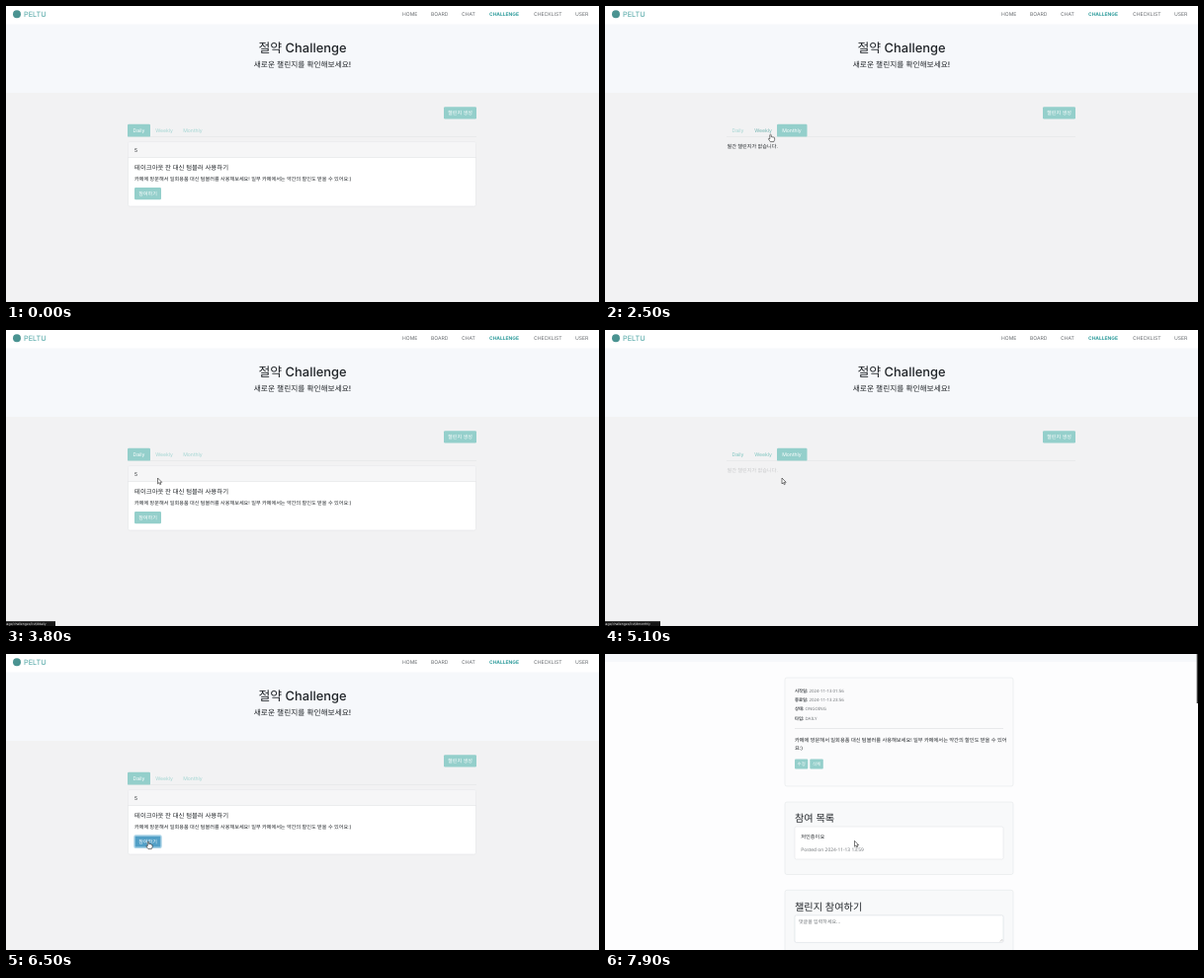
Animation of 600x300 px, one loop 8000 ms. Source, as an HTML page:

```html
<!DOCTYPE html>
<html lang="ko">
<head>
<meta charset="utf-8">
<title>Challenge</title>
<style>
html, body { margin: 0; width: 100%; height: 100%; overflow: hidden; background: #f2f2f3; }
svg { display: block; width: 100%; height: 100%; }
text { white-space: pre; text-rendering: geometricPrecision; }
.ui { font-family: Inter, "Noto Sans CJK KR", "Noto Sans CJK JP", sans-serif; }
.doc { font-family: "Noto Sans", "Noto Sans CJK KR", "Noto Sans CJK JP", sans-serif; }
</style>
</head>
<body>
<svg id="stage" viewBox="0 0 600 300"></svg>
<script>
const LOOP = 8000, STEP = 100;
const TEAL = '#94cfcb', INK = '#212529', GREY = '#74787c';

const rect = (x, y, w, h, fill, extra = '') =>
  `<rect x="${x}" y="${y}" width="${w}" height="${h}" fill="${fill}" ${extra}/>`;
const text = (x, y, size, str, fill = INK, extra = '') =>
  `<text x="${x}" y="${y}" font-size="${size}" fill="${fill}" ${extra}>${str}</text>`;
const group = (id, body, extra = '') => `<g id="${id}" ${extra}>${body}</g>`;
const edge = (color, r = 1.5) => `stroke="${color}" stroke-width=".5" rx="${r}"`;
const MID = 'text-anchor="middle" font-weight="500"';
const MEDIUM = 'font-weight="500"';

const tabs = [
  { name: 'Daily', x: 123, w: 23, tx: 128.5, bar: 50 },
  { name: 'Weekly', x: 146, w: 28, tx: 151.2, bar: 53 },
  { name: 'Monthly', x: 174, w: 30.5, tx: 179.2, bar: 56 }
];
const tip = '카페에 방문해서 일회용품 대신 텀블러를 사용해보세요! 일부 카페에서는 약간의 할인도 받을 수 있어';

function header(title, sub) {
  const links = [['HOME', 401], ['BOARD', 430], ['CHAT', 461], ['CHALLENGE', 489], ['CHECKLIST', 534], ['USER', 576]];
  return rect(0, 18, 600, 70, '#f6f8fb') + rect(0, 0, 600, 18.5, '#fff') +
    '<circle cx="11" cy="8.2" r="4" fill="#4a9391"/>' +
    text(18, 10.6, 7.3, 'PELTU', '#4aa3a2') +
    links.map(([s, x]) => s === 'CHALLENGE'
      ? text(x, 9.9, 4.95, s, '#2f9c9c', 'font-weight="700"')
      : text(x, 9.9, 5.1, s, '#666a6e')).join('') +
    text(300, 46.6, 12.9, title, INK, MID) +
    text(300, 61.6, 7.7, sub, INK, MID);
}

function card(num, title, body, id) {
  return rect(123.5, 138, 352, 65, '#fff', edge('#dcdee1')) +
    rect(123.8, 138.3, 351.4, 15.2, '#f6f6f7') + rect(123.5, 153.3, 352, .5, '#dcdee1') +
    text(130, 147.8, 5.1, num) +
    text(130, 166, 6.4, title, INK, MEDIUM) +
    text(130, 177.2, 5.12, body) +
    rect(130, 184, 27, 12.3, TEAL, `id="${id}" rx="1.2"`) +
    text(143.5, 192.1, 5.1, '참여하기', '#fff', MID);
}

function listPage() {
  return rect(0, 0, 600, 300, '#f2f2f3') + header('절약 Challenge', '새로운 챌린지를 확인해보세요!') +
    rect(443, 102.3, 33, 12.2, TEAL, 'rx="1.2"') +
    text(459.5, 110.3, 5.1, '챌린지 생성', '#fff', MID) +
    rect(123, 132.4, 353, .5, '#dfe1e3') +
    rect(123, 119.8, 23, 12.8, TEAL, 'id="pill" rx="1.2"') +
    tabs.map((t, i) => text(t.tx, 128, 5.12, t.name, TEAL, `id="tab${i}"`)).join('') +
    group('pane0', card('5', '테이크아웃 잔 대신 텀블러 사용하기', tip + '요:)', 'join')) +
    group('pane1', card('6', '무지출챌린지 예시예요', '일주일 지출없이 보내기', 'join2')) +
    group('pane2', text(123.5, 143.6, 5.12, '월간 챌린지가 없습니다.'));
}

// Laid out at its final scroll position.
function detailPage() {
  const box = (y, h) => rect(182, y, 231, h, '#f8f9fa', edge('#dfe2e5', 2));
  const field = (y, key, val) => `<text x="192" y="${y}" font-size="4.4" fill="${GREY}">` +
    `<tspan font-weight="600" fill="#45494d">${key}:</tspan> ${val}</text>`;
  const button = (x, w, s) => rect(x, 106.6, w, 10, TEAL, 'rx="1"') +
    text(x + w / 2, 113.2, 4.4, s, '#fff', 'text-anchor="middle"');
  return `<g class="ui" transform="translate(0 -80)">${header('테이크아웃 잔 대신 텀블러 사용하기', '챌린지 상세 정보')}</g>` +
    rect(182, 24, 231, 110, '#fbfbfc', edge('#dfe2e5', 2)) +
    field(39, '시작일', '2024-11-13 01:56') + field(48.2, '종료일', '2024-11-13 23:56') +
    field(57.4, '상태', 'ONGOING') + field(66.6, '타입', 'DAILY') +
    rect(192, 75.4, 211, .5, '#d5d7d9') +
    text(192, 89.2, 5.22, tip, INK, MEDIUM) + text(192, 97, 5.22, '요:)', INK, MEDIUM) +
    button(192, 13.3, '수정') + button(207.3, 13.5, '삭제') +
    box(150, 73.5) + text(192, 170.3, 10.2, '참여 목록', INK, MEDIUM) +
    rect(192, 175, 211, 33, '#fff', edge('#dcdfe2')) +
    text(198.3, 187, 5.2, '저인증이요', INK, MEDIUM) +
    text(198.3, 199.8, 4.9, 'Posted on 2024-11-13 13:59', GREY) +
    box(239.3, 130) + text(192, 259.8, 10.2, '챌린지 참여하기', INK, MEDIUM) +
    rect(192, 264.8, 211, 27.6, '#fff', edge('#ced4da')) +
    text(196, 272.6, 5, '댓글을 입력하세요...', GREY) +
    '<path d="M399.8 291.4l2.4-2.4M401.2 291.4l1-1" stroke="#888" stroke-width=".4"/>';
}

const arrow = '<path d="M0 0V5.9L1.4 4.7 2.3 6.7 3.3 6.2 2.4 4.3H4.2Z" fill="#fff" stroke="#222" stroke-width=".6" stroke-linejoin="round"/>';
const hand = '<path d="M-.7.6Q0-.4.7.6V2.7Q1.5 2.2 2 2.9 2.8 2.5 3.2 3.2 4 3 4.1 3.9V5.6L3.3 7.6H-.1L-2.1 4.9Q-2.2 3.8-.7 4.6Z" fill="#fff" stroke="#222" stroke-width=".6" stroke-linejoin="round"/>';

document.getElementById('stage').innerHTML =
  group('list', listPage(), 'class="ui"') +
  group('detail', rect(0, 0, 600, 300, '#fdfdfe') + group('sheet', detailPage()) +
    rect(598.7, 0, 1.3, 50, '#3a3a3a'), 'class="doc"') +
  group('bar', rect(0, 295.2, 53, 4.8, '#161616', 'id="barBox"') +
    text(-1.5, 299, 3.3, '', '#eee', 'id="barText"'), 'class="ui"') +
  group('arrow', arrow) + group('hand', hand);

const $ = id => document.getElementById(id);
const set = (id, attrs) => { for (const k in attrs) $(id).setAttribute(k, attrs[k]); };
const show = (id, on) => set(id, { display: on ? 'inline' : 'none' });
const clamp = v => Math.max(0, Math.min(1, v));
const ease = p => p * p * (3 - 2 * p);

// [time, tab]
const clicks = [[-1000, 0], [1230, 1], [1930, 2], [2580, 1], [3350, 0], [4250, 1], [4920, 2], [5470, 0]];
// [from, to, tab]
const hints = [[1000, 1700, 1], [1700, 2200, 2], [2600, 3100, 1], [3100, 4000, 0], [4100, 4600, 1], [4600, 5300, 2], [5300, 5800, 0]];
// [time, x, y]
const path = [
  [400, 236, 212], [900, 172, 130], [1500, 172, 130], [1800, 188, 128], [2100, 188, 128],
  [2500, 167.5, 130], [2700, 165, 129], [3100, 136, 129], [3500, 136, 129], [3800, 153.5, 150],
  [4100, 160, 128], [4300, 160, 128], [4700, 188, 128], [4900, 188, 128], [5100, 179, 150],
  [5400, 134, 128], [5600, 134, 128], [6200, 144, 190], [6700, 144, 190], [7300, 247.5, 216],
  [7400, 247.5, 216], [7900, 252.5, 189.3]
];

function pointer(t) {
  const i = path.findIndex(p => p[0] > t);
  if (i < 0) return path[path.length - 1].slice(1);
  const [a, b] = [path[Math.max(0, i - 1)], path[i]];
  const p = ease(clamp((t - a[0]) / (b[0] - a[0])));
  return [a[1] + (b[1] - a[1]) * p, a[2] + (b[2] - a[2]) * p];
}

function draw(t) {
  const onDetail = t >= 6700;
  const [x, y] = pointer(t);
  const over = !onDetail && y > 119 && y < 134 ? tabs.findIndex(b => x >= b.x && x < b.x + b.w) : -1;
  const overJoin = !onDetail && x > 130 && x < 157 && y > 184 && y < 197;

  // The old pane fades out before the new one fades in.
  const n = clicks.filter(c => c[0] <= t).length - 1;
  const [since, active] = clicks[n];
  const age = t - since;
  const alpha = [0, 0, 0];
  if (age < 150) alpha[clicks[Math.max(0, n - 1)][1]] = 1 - age / 150;
  else alpha[active] = clamp((age - 150) / 150);

  set('pill', { x: tabs[active].x, width: tabs[active].w });
  tabs.forEach((tab, i) => {
    const idle = age < 300 ? '#7cc4bf' : '#a2d5d2';
    set('tab' + i, { fill: i === over && t >= 900 ? '#72b3b0' : i === active ? '#fff' : idle });
    set('pane' + i, { opacity: alpha[i] });
  });
  set('join', {
    fill: overJoin ? '#519fc6' : TEAL,
    stroke: overJoin && t >= 6400 ? '#a9d2e6' : 'none',
    'stroke-width': 1.4
  });

  const hint = hints.find(h => t >= h[0] && t < h[1]);
  show('bar', hint);
  if (hint) {
    const tab = tabs[hint[2]];
    set('barBox', { width: tab.bar });
    $('barText').textContent = 'page/challenges/list/#' + tab.name.toLowerCase();
  }

  show('list', !onDetail);
  show('detail', onDetail);
  set('sheet', { transform: `translate(0 ${80 * (1 - ease(clamp((t - 6900) / 400)))})` });

  const pointing = over >= 0 || overJoin;
  show('arrow', t >= 400 && !pointing);
  show('hand', t >= 400 && pointing);
  const transform = `translate(${x} ${y})`;
  set('arrow', { transform });
  set('hand', { transform });
}

const start = performance.now();
function tick() {
  const t = (performance.now() - start) % LOOP;
  draw(Math.floor(t / STEP) * STEP);
  requestAnimationFrame(tick);
}
tick();
</script>
</body>
</html>
```
